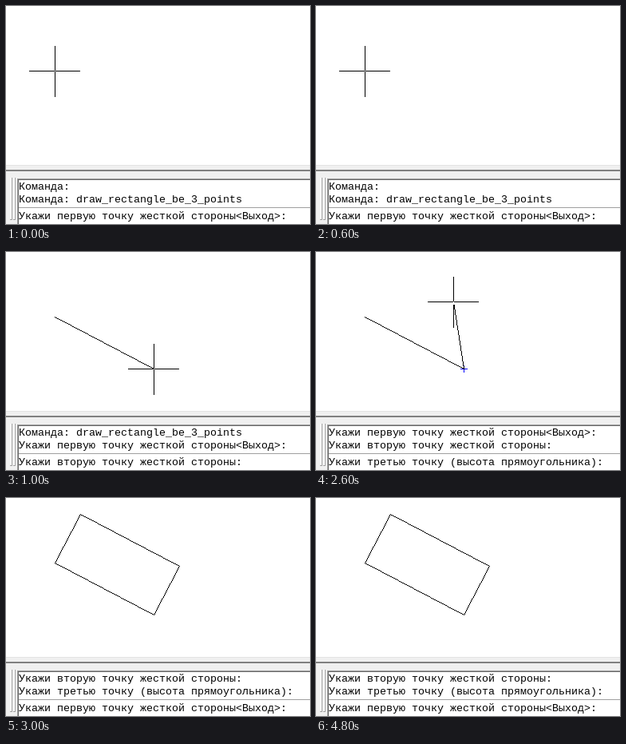
These frames come from a looping animation (381x273 px, 6000 ms). An HTML page with a canvas:

```html
<!DOCTYPE html>
<html lang="ru">
<head>
<meta charset="utf-8">
<title>Прямоугольник по трём точкам</title>
<style>
html, body { margin: 0; width: 100%; height: 100%; overflow: hidden; background: #fff; }
canvas, svg { position: absolute; left: 0; top: 0; display: block; }
text { font: 13.333px "Liberation Mono", "Courier New", monospace; fill: #000; white-space: pre; }
</style>
</head>
<body>
<canvas id="view" width="381" height="273"></canvas>
<svg width="381" height="273">
  <text x="16" y="230"></text>
  <text x="16" y="246"></text>
  <text x="16" y="267"></text>
</svg>
<script>
const ctx = document.getElementById('view').getContext('2d');
const rows = document.querySelectorAll('text');
const A = [61, 81], B = [185, 146], C = [217, 85], D = [93, 20], P = [172, 62];

const log = [
  'Команда:',
  'Команда: draw_rectangle_be_3_points',
  'Укажи первую точку жесткой стороны<Выход>:',
  'Укажи вторую точку жесткой стороны:',
  'Укажи третью точку (высота прямоугольника):',
  'Укажи первую точку жесткой стороны<Выход>:'
];

const steps = [
  { at: 0, cursor: A, lines: [] },
  { at: 1000, cursor: B, lines: [[A, B]] },
  { at: 2000, cursor: P, mark: B, lines: [[A, B], [B, P]] },
  { at: 3000, lines: [[A, B], [B, C], [C, D], [D, A]] }
];
const LOOP = 6000;

function box(color, x, y, w, h) {
  ctx.fillStyle = color;
  ctx.fillRect(x, y, w, h);
}

// One-pixel line without smoothing; the end point is left out
function line([x0, y0], [x1, y1]) {
  const dx = x1 - x0, dy = y1 - y0;
  const n = Math.max(Math.abs(dx), Math.abs(dy));
  for (let i = 0; i < n; i++) {
    box('#000', Math.round(x0 + dx * i / n), Math.round(y0 + dy * i / n), 1, 1);
  }
}

// The cursor inverts whatever lies under it
function crosshair([x, y]) {
  ctx.globalCompositeOperation = 'difference';
  box('#fff', x - 32, y, 64, 1);
  box('#fff', x, y - 31, 1, 64);
  ctx.globalCompositeOperation = 'source-over';
}

function panel() {
  box('#e3e3e3', 0, 199, 381, 1);
  box('#f0f0f0', 0, 200, 381, 73);
  box('#808080', 0, 205, 381, 2);
  for (const x of [5, 9]) {
    box('#fff', x, 215, 2, 52);
    box('#a0a0a0', x + 2, 215, 1, 53);
    box('#a0a0a0', x, 267, 3, 1);
  }
  box('#a0a0a0', 14, 216, 367, 57);
  box('#696969', 15, 217, 366, 56);
  box('#fff', 16, 218, 365, 55);
  box('#a0a0a0', 16, 252, 365, 1);
}

function draw(index) {
  const { cursor, mark, lines } = steps[index];
  box('#fff', 0, 0, 381, 273);
  panel();
  if (mark) {
    box('#00f', mark[0] - 4, mark[1], 9, 1);
    box('#00f', mark[0], mark[1] - 4, 1, 9);
  }
  lines.forEach(([a, b]) => line(a, b));
  if (cursor) crosshair(cursor);
  rows.forEach((row, i) => { row.textContent = log[index + i]; });
}

let shown = -1;
const start = performance.now();
function tick(now) {
  const t = Math.max(0, now - start) % LOOP;
  const index = steps.filter(s => s.at <= t).length - 1;
  if (index !== shown) draw(shown = index);
  requestAnimationFrame(tick);
}
tick(start);
</script>
</body>
</html>
```
